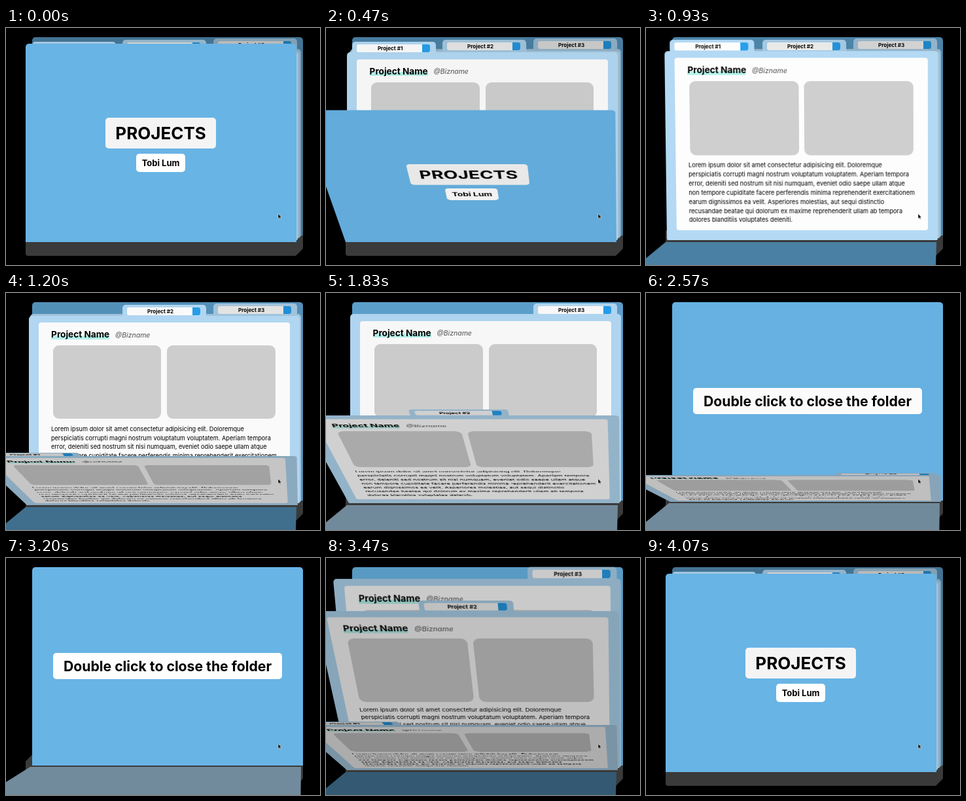
An HTML page for the animation above (4100 ms loop, 480 by 362 pixels).

```html
<!DOCTYPE html>
<html lang="en">
<head>
<meta charset="utf-8">
<title>Project folder</title>
<style>
  html, body { margin: 0; width: 100%; height: 100%; overflow: hidden; background: #000; }
  #stage {
    position: absolute; left: 0; top: 0; width: 480px; height: 362px;
    overflow: hidden; background: #000; color: #000;
    font: 9.2px Inter, sans-serif;
    perspective: 1770px; perspective-origin: 454px 385px;
  }
  #stage div, #stage svg { position: absolute; box-sizing: border-box; }
  #stage .layer { width: 414px; height: 303px; transform-origin: 50% 100%; }
  .center { text-align: center; }
  .bold { font-weight: 700; }
  .text { white-space: pre; }
  .fallen > .inner { visibility: hidden; }
</style>
</head>
<body>
<div id="stage"></div>
<script>
const LOOP = 4100, OPEN_MS = 640, CLOSE_MS = 600;
const FULL_ANGLE = 103, DISTANCE = 1770, EYE_Y = 385;
const BLUE = '#68b4e5', PALE = '#b4dbf6', ACCENT = '#26a0ee';
const LOREM = [
  'Lorem ipsum dolor sit amet consectetur adipisicing elit. Doloremque',
  'perspiciatis corrupti magni nostrum voluptatum voluptatem. Aperiam tempora',
  'error, deleniti sed nostrum sit nisi numquam, eveniet odio saepe ullam atque',
  'non tempore cupiditate facere perferendis minima reprehenderit exercitationem',
  'earum dignissimos ea velit. Asperiores molestias, aut sequi distinctio',
  'recusandae beatae qui dolorum ex maxime reprehenderit ullam ab tempora',
  'dolores blanditiis voluptates deleniti.'
].join('\n');

const stage = document.getElementById('stage');

function add(parent, className, style, text) {
  const el = document.createElement('div');
  el.className = className;
  Object.assign(el.style, style);
  if (text) el.textContent = text;
  parent.append(el);
  return el;
}

const px = n => n + 'px';

function box(parent, x, y, w, h, background, radius = 0, className = '') {
  return add(parent, className, {
    left: px(x), top: px(y), width: px(w), height: px(h), background,
    borderRadius: typeof radius === 'number' ? px(radius) : radius
  });
}

// Text whose capitals are centred on midY.
function label(parent, x, midY, size, text, className = 'bold') {
  return add(parent, 'text ' + className, {
    left: px(x), top: px(midY - 20), lineHeight: '40px', fontSize: px(size)
  }, text);
}

function button(parent, x, y, w, h, size, text, background) {
  const el = box(parent, x, y, w, h, background, 5, 'text center bold inner');
  el.style.fontSize = px(size);
  el.style.lineHeight = px(h);
  el.textContent = text;
}

function makeLayer(depth, left = 40, top = 14) {
  const offset = depth * 2.5;
  const el = add(stage, 'layer', { left: px(left - offset), top: px(top + offset) });
  return { el, depth, hinge: top + offset + 303 };
}

function makeCover(depth) {
  const layer = makeLayer(depth);
  box(layer.el, 0, 0, 414, 303, BLUE, '5px 5px 0 0');
  return layer;
}

function makePage(depth, tabX, number) {
  const layer = makeLayer(depth, 39.7, 13.4), { el } = layer;
  box(el, tabX, 0, 128, 24, PALE, 5);
  box(el, 0, 16.5, 414, 286.5, PALE, '5px 5px 2px 2px');

  const inner = add(el, 'inner', { left: 0, top: 0 });
  const tab = box(inner, tabX + 7.2, 4, 112, 12, '#fff', 3);
  box(tab, 100, 0, 12, 12, ACCENT, '0 3px 3px 0');
  label(tab, 0, 6, 8.05, 'Project #' + number, 'bold center').style.width = '102.5px';

  box(inner, 15, 27, 384, 260.5, '#fff', 4);
  const title = label(inner, 34.4, 45.1, 13.6, 'Project Name');
  title.style.background = 'linear-gradient(#b8f5ee, #b8f5ee) 0 21.5px / 100% 6px no-repeat';
  const company = label(inner, 132.3, 46.6, 10.4, '@Bizname', '');
  Object.assign(company.style, { fontStyle: 'italic', fontWeight: 500, color: '#6b6b6b' });
  for (const x of [37, 211.4]) box(inner, x, 62, 165.5, 111.7, '#d1d1d1', 9);
  add(inner, 'text', { left: '34.2px', top: '182.4px', lineHeight: '13.85px' }, LOREM);
  return layer;
}

function makeBase() {
  for (let d = 0; d <= 10; d += 0.5) {
    box(stage, 40 - d, 300 + d, 414, 38, '#3a3a3a', '0 0 4px 4px');
  }
}

makeBase();
const back = makeCover(0);
button(back.el, 32, 131, 350, 40, 21.2, 'Double click to close the folder', '#fff');

const page3 = makePage(1, 279.5, 3);
const page2 = makePage(2, 143, 2);
const page1 = makePage(3, 7.5, 1);
const cover = makeCover(4);
button(cover.el, 122, 113, 169, 47, 26, 'PROJECTS', '#f4f4f4');
button(cover.el, 169, 168, 75, 28, 13, 'Tobi Lum', '#fff');

// Shade: how dark a fallen layer gets, and the time it takes each way.
const coverShade = { depth: 0.5, inMs: 2000, outMs: 600 };
const pageShade = { depth: 0.37, inMs: 850, outMs: 850 };

// Front to back, with the moments each one starts to open and to close.
const movers = [
  { ...cover, shade: coverShade, openAt: 265, closeAt: 3470 },
  { ...page1, shade: pageShade, openAt: 901, closeAt: 3371 },
  { ...page2, shade: pageShade, openAt: 1582, closeAt: 3272 },
  { ...page3, shade: pageShade, openAt: 2234, closeAt: 3177 }
];

stage.insertAdjacentHTML('beforeend',
  `<svg style="left:415px;top:283px;z-index:30" width="9" height="12" viewBox="0 0 9 12">
    <path d="M1 .8V8.2L2.7 6.7 3.9 9.3 5 8.8 3.9 6.3H6.1Z" fill="#000" stroke="#fff" stroke-width=".5"/>
  </svg>`);

// cubic-bezier(.25, .1, .25, 1)
function ease(x) {
  if (x <= 0) return 0;
  if (x >= 1) return 1;
  const bezier = (a, b, u) => 3 * a * u * (1 - u) ** 2 + 3 * b * u * u * (1 - u) + u ** 3;
  let lo = 0, hi = 1;
  for (let i = 0; i < 24; i++) {
    const mid = (lo + hi) / 2;
    if (bezier(0.25, 0.25, mid) < x) lo = mid; else hi = mid;
  }
  return bezier(0.1, 1, lo);
}

function draw(time) {
  const t = time % LOOP;
  let covered = 0;
  for (const { el, depth, hinge, shade, openAt, closeAt } of movers) {
    const progress = (inMs, outMs) =>
      ease((t - openAt) / inMs) * (1 - ease((t - closeAt) / outMs));
    const opened = progress(OPEN_MS, CLOSE_MS);
    const fade = shade.depth * progress(shade.inMs, shade.outMs);
    const angle = FULL_ANGLE * opened, rad = angle * Math.PI / 180;
    // The eye is past the plane of the layer, so its back shows.
    const fallen = Math.cos(rad) * DISTANCE < (hinge - EYE_Y) * Math.sin(rad);

    el.style.transform = angle ? `rotateX(${-angle}deg)` : 'none';
    el.style.zIndex = fallen ? 5 - depth : 10 + depth;
    el.style.filter = `brightness(${(1 - fade) * (1 - 0.09 * covered)})`;
    el.classList.toggle('fallen', fallen);
    covered += 1 - opened;
  }
  back.el.style.filter = `brightness(${1 - 0.09 * covered})`;
}

const start = performance.now();
function tick() {
  draw(performance.now() - start);
  requestAnimationFrame(tick);
}
tick();
</script>
</body>
</html>
```
